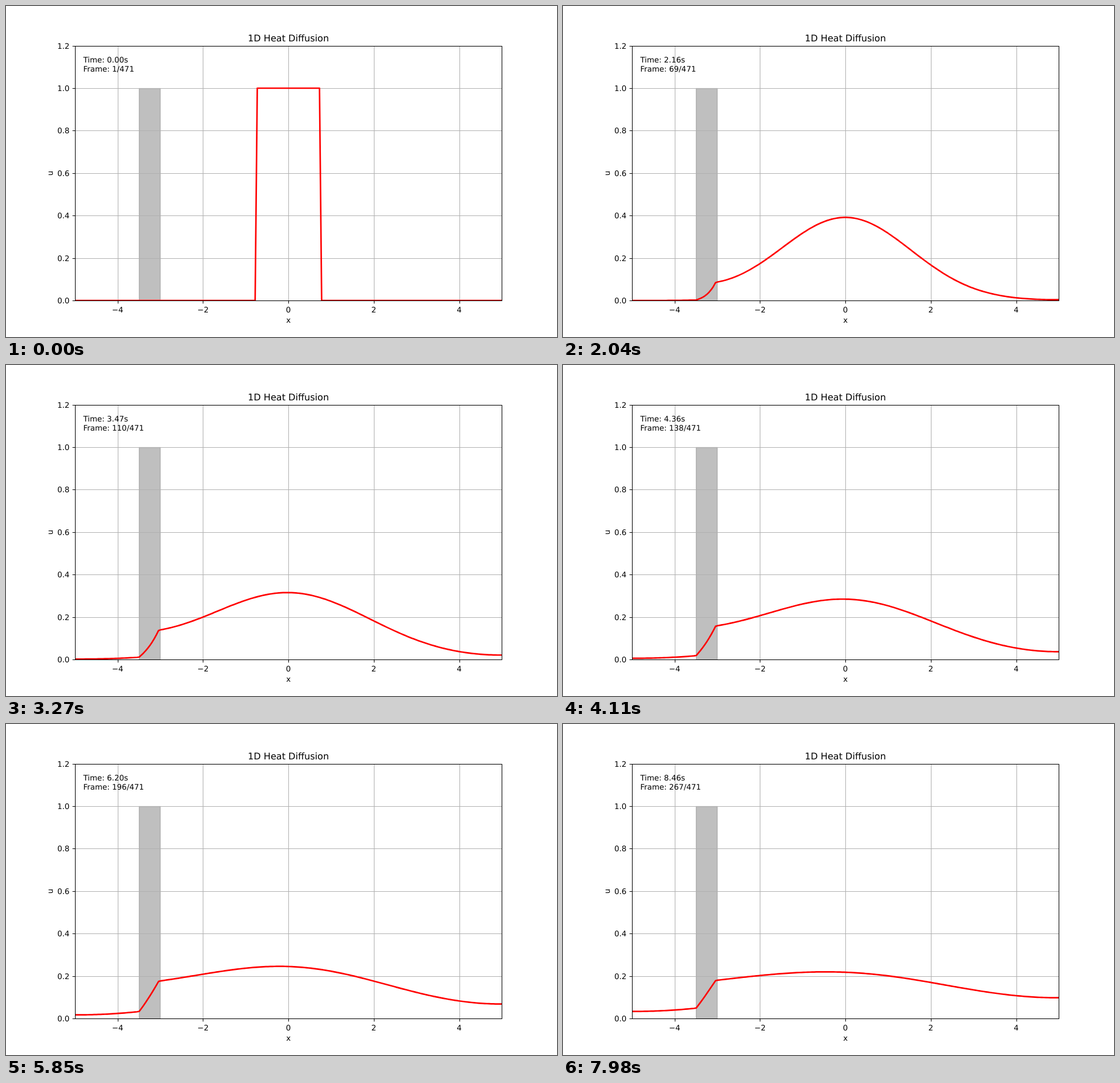
Write an HTML page that moves like this. It is 966 px wide and 580 px high and loops after 8000 ms.

```html
<!DOCTYPE html>
<html lang="en">
<head>
<meta charset="utf-8">
<title>1D Heat Diffusion</title>
<style>
  html, body { margin: 0; width: 100%; height: 100%; overflow: hidden; background: #fff; }
  svg { display: block; width: 966px; height: 580px; }
  text { font: 13.42px "DejaVu Sans", sans-serif; text-rendering: geometricPrecision; white-space: pre; }
  .title { font-size: 16.1px; }
  .mid { text-anchor: middle; }
  .end { text-anchor: end; }
  .grid { stroke: #b0b0b0; stroke-width: 1.07; }
  .axis { stroke: #000; stroke-width: 1.07; fill: none; }
</style>
</head>
<body>
<svg viewBox="0 0 966 580">
  <defs><clipPath id="plot"><rect x="121" y="70" width="749" height="446.5"/></clipPath></defs>
  <rect width="966" height="580" fill="#fff"/>
  <rect x="233.5" y="144.5" width="37" height="372" fill="#808080" stroke="#808080" stroke-width="1.34" opacity="1" fill-opacity=".5" stroke-opacity=".5" clip-path="url(#plot)"/>
  <g id="grid"></g>
  <path id="curve" clip-path="url(#plot)" fill="none" stroke="#f00" stroke-width="2.68" stroke-linejoin="round"/>
  <g id="axes"></g>
  <rect class="axis" x="121.5" y="70.5" width="748" height="446"/>
  <text class="title mid" x="495.1" y="61.7">1D Heat Diffusion</text>
  <text class="mid" x="495.1" y="554.6">x</text>
  <text class="mid" transform="translate(81.8 293) rotate(-90)">u</text>
  <text id="time" x="135.5" y="99"></text>
  <text id="count" x="135.5" y="115.3"></text>
</svg>
<script>
const $ = id => document.getElementById(id);

// Axes: x in [-5, 5], u in [0, 1.2]
const px = x => 120.75 + (x + 5) * 74.865;
const py = u => 516.2 - u * 372.17;
const snap = v => Math.floor(v + 0.5) + 0.5;

function add(parent, tag, attrs, text = "") {
  const el = document.createElementNS("http://www.w3.org/2000/svg", tag);
  for (const k in attrs) el.setAttribute(k, attrs[k]);
  el.textContent = text;
  parent.appendChild(el);
}

function line(parent, cls, x1, y1, x2, y2) {
  add(parent, "line", { class: cls, x1, y1, x2, y2 });
}

for (let v = -4; v <= 4; v += 2) {
  const x = snap(px(v));
  line($("grid"), "grid", x, 70, x, 516.5);
  line($("axes"), "axis", x, 516.5, x, 521.4);
  add($("axes"), "text", { class: "mid", x: px(v), y: 536.8 }, String(v).replace("-", "\u2212"));
}
for (let k = 0; k <= 6; k++) {
  const y = snap(py(k / 5));
  line($("grid"), "grid", 121, y, 869.5, y);
  line($("axes"), "axis", 116.6, y, 121.5, y);
  add($("axes"), "text", { class: "end", x: 111.4, y: py(k / 5) + 5 }, (k / 5).toFixed(1));
}

// Explicit heat equation with a poorly conducting wall and insulated ends
const N = 200, D = 0.5, WALL = 0.04, SUBSTEPS = 14;
const FRAMES = 267, TOTAL = 471, FRAME_MS = 30, LOOP_MS = 8000;
const dx = 10 / (N - 1), dt = 0.45 * dx * dx / D;
const xs = Array.from({ length: N }, (_, i) => -5 + i * dx);
const cond = xs.map(x => (x >= -3.5 && x <= -3 ? WALL : D));
const rate = xs.map((_, i) => (cond[i] + (cond[i + 1] ?? D)) / 2 * dt / (dx * dx));

function step(u) {
  const next = u.slice();
  for (let i = 1; i < N - 1; i++) {
    next[i] += rate[i] * (u[i + 1] - u[i]) - rate[i - 1] * (u[i] - u[i - 1]);
  }
  next[0] = next[1];
  next[N - 1] = next[N - 2];
  return next;
}

const toPath = u => "M" + u.map((v, i) => px(xs[i]).toFixed(2) + " " + py(v).toFixed(2)).join("L");

const paths = [];
let u = xs.map(x => (Math.abs(x) < 0.75 ? 1 : 0));
for (let f = 0; f < FRAMES; f++) {
  paths.push(toPath(u));
  for (let s = 0; s < SUBSTEPS; s++) u = step(u);
}

let shown = -1;
function draw(now) {
  const f = Math.min(FRAMES - 1, Math.floor((now % LOOP_MS) / FRAME_MS));
  if (f !== shown) {
    shown = f;
    $("curve").setAttribute("d", paths[f]);
    $("time").textContent = `Time: ${(f * SUBSTEPS * dt).toFixed(2)}s`;
    $("count").textContent = `Frame: ${f + 1}/${TOTAL}`;
  }
}

function tick() {
  draw(performance.now());
  requestAnimationFrame(tick);
}
tick();
</script>
</body>
</html>
```
